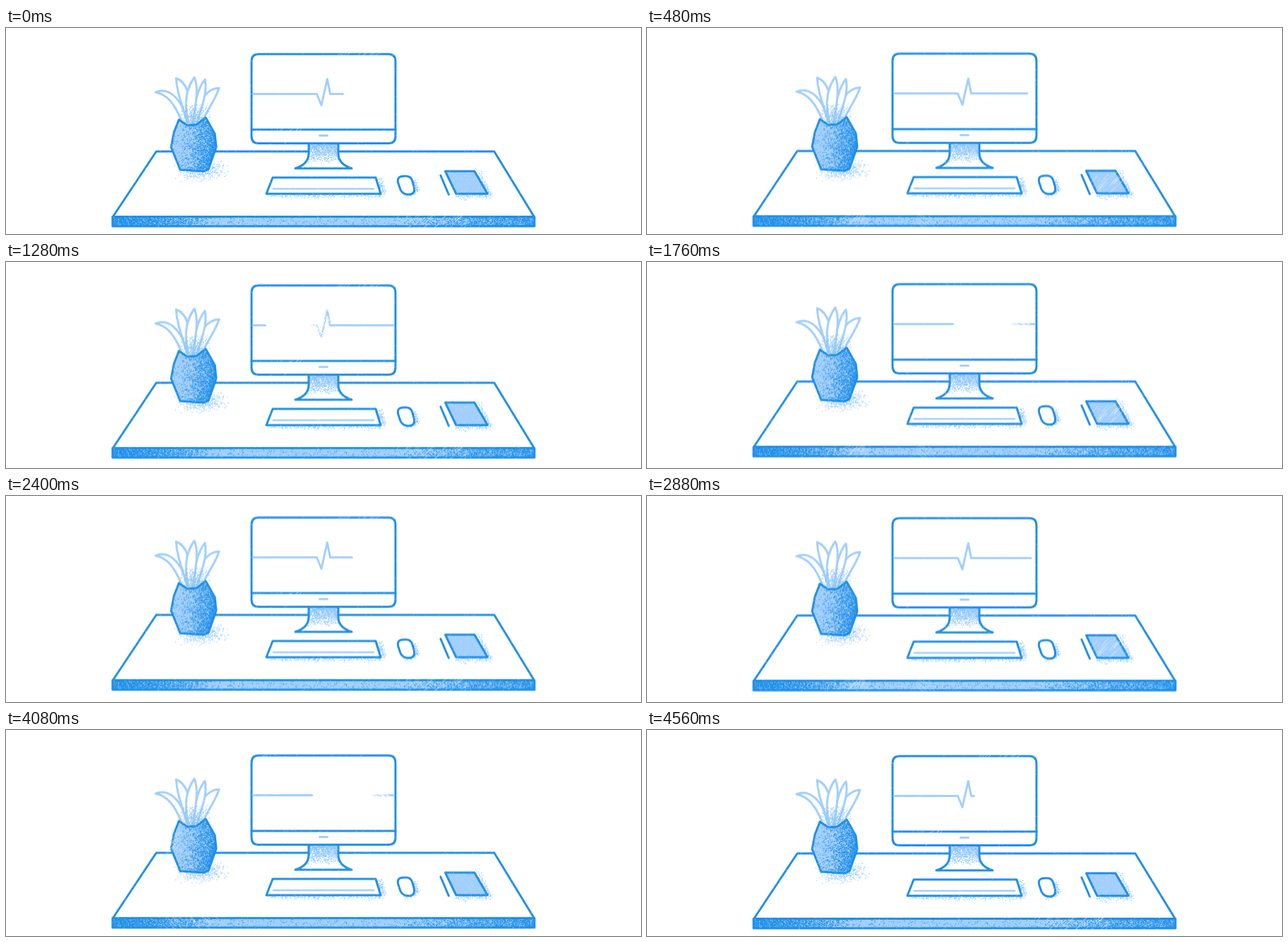
An HTML page with a canvas that plays this animation: 900x292 px, repeating every 4640 ms.

```html
<!DOCTYPE html>
<html lang="en">
<head>
<meta charset="utf-8">
<title>Desk with pulse monitor</title>
<style>
  html, body { margin: 0; width: 100%; height: 100%; overflow: hidden; background: #fff; }
  canvas { display: block; width: 900px; height: 292px; }
</style>
</head>
<body>
<canvas id="stage" width="900" height="292"></canvas>
<script>
const start = performance.now();
const W = 900, H = 292, LOOP = 4640, BEAT = LOOP / 2, STEP = 80;
const BLUE = '#1f8fe8', LIGHT = '#a2cffc', DOT = '#86c1fa';
const stage = document.getElementById('stage').getContext('2d');

let seed = 7;
const rnd = () => {
  seed = seed * 16807 % 2147483647;
  return seed / 2147483647;
};
const spread = r => (rnd() + rnd() + rnd() - 1.5) * 1.3 * r;
const clamp = v => Math.max(0, Math.min(1, v));

function layer(draw) {
  const c = document.createElement('canvas');
  c.width = W;
  c.height = H;
  const g = c.getContext('2d');
  g.lineCap = g.lineJoin = 'round';
  draw(g);
  return c;
}

function shape(g, d, fill, line = BLUE, width = 3) {
  const p = new Path2D(d);
  if (fill) { g.fillStyle = fill; g.fill(p); }
  if (line) { g.strokeStyle = line; g.lineWidth = width; g.stroke(p); }
}

// Stipple a box, clipped to a path, with a density of 0..1 per point
function grain(g, d, x, y, w, h, color, density) {
  g.save();
  if (d) g.clip(new Path2D(d));
  g.fillStyle = color;
  for (let i = 0; i < w * h * 2; i++) {
    const px = x + rnd() * w, py = y + rnd() * h;
    if (rnd() < density(px, py)) g.fillRect(px, py, 1, 1);
  }
  g.restore();
}

// Loose dots around a straight edge
function scatter(g, ax, ay, bx, by, r) {
  g.fillStyle = DOT;
  const n = Math.hypot(bx - ax, by - ay) * 2 + r * 16;
  for (let i = 0; i < n; i++) {
    const k = rnd();
    g.fillRect(ax + (bx - ax) * k + spread(r), ay + (by - ay) * k + spread(r), 1, 1);
  }
}

const VASE = 'M245 130L257 138L270 137L283 127L296 150L298 169L287 200L280 203L247 201L234 169L238 148Z';
const STAND = 'M429 163V178Q429 193 410 199H490Q471 193 471 178V163Z';
const FRONT = 'M151 267.5H749V281H151Z';
const LEAVES = [
  'M248 130C241 112 230 94 212 91C232 83 249 101 258 134',
  'M280 129C287 113 297 101 302 85C282 86 272 106 267 134',
  'M257 134C250 108 243 96 241 71C257 77 262 96 263 134',
  'M264 134C268 106 271 86 282 73C286 92 277 112 271 134',
  'M259 134C250 104 258 82 267 70C274 86 268 112 265 134'
];

const scene = layer(g => {
  // Desk
  shape(g, 'M213 175H692L748.5 267.5H151.5Z', '#fff');
  shape(g, FRONT, LIGHT, null);
  grain(g, FRONT, 151, 267, 598, 14, BLUE, x =>
    Math.max(clamp(1 - (x - 151) / 150), .65 * clamp((x - 550) / 200), .03));
  shape(g, FRONT);

  // Plant
  scatter(g, 250, 202, 305, 201, 10);
  scatter(g, 260, 202, 297, 201, 10);
  for (const d of LEAVES) shape(g, d, '#fff', LIGHT);
  grain(g, null, 240, 106, 52, 34, DOT, (x, y) =>
    .7 * clamp((y - 106) / 28) * clamp(1 - Math.abs(x - 266) / 24));
  shape(g, VASE, LIGHT, null);
  grain(g, VASE, 234, 126, 64, 78, BLUE, (x, y) =>
    .03 + .7 * Math.pow(clamp((x - 246 + (y - 165) * .12) / 48), 1.6));
  shape(g, VASE);

  // Monitor
  shape(g, STAND, '#fff', null);
  grain(g, STAND, 410, 163, 80, 36, DOT, (x, y) => clamp(.9 - (y - 163) / 32));
  shape(g, STAND);
  shape(g, 'M358 37H542Q552 37 552 47V153.5Q552 163.5 542 163.5H358Q348 163.5 348 153.5V47Q348 37 358 37Z', '#fff');
  shape(g, 'M348 144H552');
  shape(g, 'M444.5 152.5H455.5', null, LIGHT);

  // Keyboard
  scatter(g, 370, 236, 532, 236, 4);
  scatter(g, 527, 213, 534, 235, 4);
  shape(g, 'M378 212H524L531 235H369Z', '#fff');
  shape(g, 'M379 228H521', null, LIGHT, 2.6);

  // Mouse
  scatter(g, 579, 217, 582, 231, 3);
  scatter(g, 581, 231, 564, 237, 3);
  shape(g, 'M564 210H567Q574 210 576 217L578.5 226Q580 236 571 236Q562 236 559 229L556 220Q553 210 564 210Z', '#fff');

  // Notebook
  scatter(g, 666, 204, 685, 235, 4);
  scatter(g, 638, 237, 686, 236, 4);
  shape(g, 'M616 209L627.5 236');
  shape(g, 'M622.5 203H664L682.5 235H638Z', LIGHT);
});

// Worn texture: scratched spots as x, y, radius, slant
const WEAR = [
  '500 38 26 1, 605 274 46 1, 405 146 12 1',
  '245 271 16 -1, 400 152 34 -1, 485 202 12 -1, 610 273 16 1',
  '652 218 22 1, 400 269 14 -1, 300 269 16 1',
  '370 37 18 1, 246 160 16 1, 262 274 32 -1',
  '430 38 22 1, 520 272 34 -1'
];
const wear = WEAR.map(spots => layer(g => {
  g.globalAlpha = .5;
  g.strokeStyle = '#fff';
  g.lineWidth = .9;
  for (const spot of spots.split(', ')) {
    const [x, y, r, slant] = spot.split(' ').map(Number);
    for (let i = 0; i < r * .7; i++) {
      const px = x + (rnd() * 2 - 1) * r, py = y + (rnd() * 2 - 1) * Math.min(r, 14), len = 3 + rnd() * 6;
      g.beginPath();
      g.moveTo(px - len * slant, py + len);
      g.lineTo(px + len * slant, py - len);
      g.stroke();
    }
  }
  grain(g, null, 148, 30, 606, 256, '#fff', () => .01);
}));

const PULSE = new Path2D('M351 93.5H440.5L447 109.5L455.3 72.5L459.5 93.5H549');
const PULSE_LEN = 257;
const dust = Array.from({ length: 200 * 46 }, rnd);

function pulse(g, u) {
  if (u <= 0) return;
  g.setLineDash([PULSE_LEN * (1 - Math.cos(Math.PI * clamp(u))) / 2, 999]);
  g.strokeStyle = LIGHT;
  g.lineWidth = 3;
  g.stroke(PULSE);
  g.setLineDash([]);
}

// Grainy wipe from the left, centred on x = mid
function wipe(g, mid) {
  const from = Math.round(mid) - 16;
  g.fillStyle = '#fff';
  if (from > 350) g.fillRect(350, 68, Math.min(from, 550) - 350, 46);
  for (let x = Math.max(from, 350); x < Math.min(from + 32, 550); x++) {
    const keep = (x - from) / 32;
    for (let y = 0; y < 46; y++) {
      if (dust[(x - 350) * 46 + y] > keep) g.fillRect(x, 68 + y, 1, 1);
    }
  }
}

function draw(t) {
  const beat = t % BEAT;
  const lift = -3.25 * (1 - Math.cos(2 * Math.PI * t / LOOP));
  stage.setTransform(1, 0, 0, 1, 0, 0);
  stage.fillStyle = '#fff';
  stage.fillRect(0, 0, W, H);
  stage.translate(0, lift);
  stage.lineCap = stage.lineJoin = 'round';
  stage.drawImage(scene, 0, 0);
  pulse(stage, (beat + 1393) / 2170);
  wipe(stage, 375 + .178 * (beat - 880));
  pulse(stage, (beat - 927) / 2170);
  stage.drawImage(wear[Math.floor(t % 1120 / 224)], 0, 0);
}

function tick() {
  const t = (performance.now() - start) % LOOP;
  draw(Math.floor(t / STEP) * STEP);
  requestAnimationFrame(tick);
}
tick();
</script>
</body>
</html>
```
